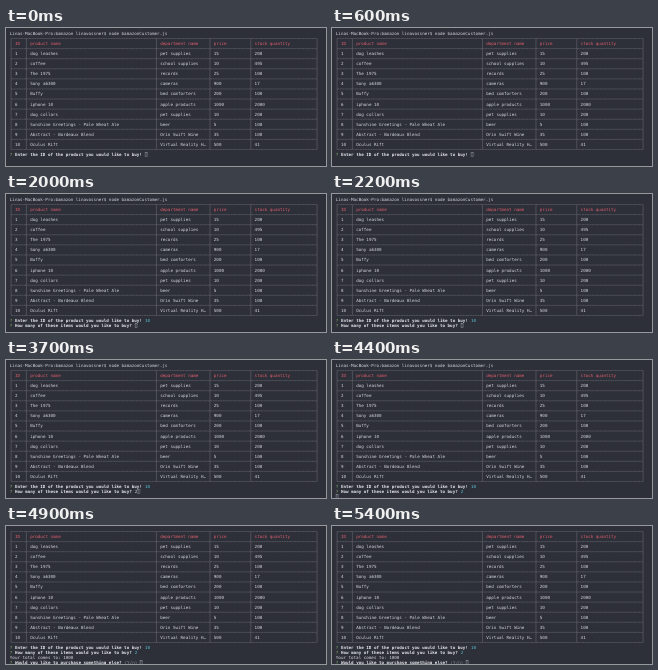
Recreate the animation shown at these times as an HTML page. Size 320 by 138 pixels, loop 7.5 s.

```html
<!DOCTYPE html>
<html lang="en">
<head>
<meta charset="utf-8">
<title>Store terminal</title>
<style>
  html, body { margin: 0; width: 100%; height: 100%; overflow: hidden; background: #2d2f39; }
  svg { display: block; width: 100vw; height: 100vh; --w: 2.55px; --h: 5.04px; }
  text {
    font: 4.2355px "DejaVu Sans Mono", "Liberation Mono", monospace;
    text-rendering: geometricPrecision;
    white-space: pre;
    fill: #d8dae0;
  }
  .head { fill: #e0606c; }
  .ask { font-weight: bold; fill: #e6e8ec; }
  .mark { fill: #8fc46c; }
  .dim { fill: #8b8f98; }
  .grid { fill: none; stroke: #747279; stroke-width: .5; }
  .dash { stroke-dasharray: 2.2 .35; }
  #cursor { fill: none; stroke: #a6a8af; stroke-width: .5; }

  #screen, #cursor, .timed { animation: 7.5s step-end infinite; }
  #screen { animation-name: scroll; }
  #cursor { animation-name: cursor; }
  #prompt { animation-name: leave; }
  #digit1 { animation-name: digit1; }
  #digit0 { animation-name: digit0; }
  #amount { animation-name: amount; }
  #second { animation-name: second; }
  #result { animation-name: result; }

  @keyframes scroll {
    0% { transform: none; }
    60%, 100% { transform: translateY(calc(-1 * var(--h))); }
  }
  @keyframes cursor {
    0%      { transform: translate(calc(53 * var(--w)), calc(24 * var(--h))); }
    10.66%  { transform: translate(calc(54 * var(--w)), calc(24 * var(--h))); }
    14.66%  { transform: translate(calc(55 * var(--w)), calc(24 * var(--h))); }
    26.66%  { transform: translate(calc(49 * var(--w)), calc(25 * var(--h))); }
    49.33%  { transform: translate(calc(50 * var(--w)), calc(25 * var(--h))); }
    58.66%  { transform: translate(0, calc(26 * var(--h))); }
    60%, 100% { transform: translate(calc(51 * var(--w)), calc(27 * var(--h))); }
  }
  @keyframes leave { 0% { opacity: 1; } 60%, 100% { opacity: 0; } }
  @keyframes digit1 {
    0% { opacity: 0; fill: #d8dae0; }
    10.66% { opacity: 1; fill: #d8dae0; }
    26.66%, 100% { opacity: 1; fill: #5ac6d4; }
  }
  @keyframes digit0 {
    0% { opacity: 0; fill: #d8dae0; }
    14.66% { opacity: 1; fill: #d8dae0; }
    26.66%, 100% { opacity: 1; fill: #5ac6d4; }
  }
  @keyframes amount {
    0% { opacity: 0; fill: #d8dae0; }
    49.33% { opacity: 1; fill: #d8dae0; }
    58.66%, 100% { opacity: 1; fill: #5ac6d4; }
  }
  @keyframes second { 0% { opacity: 0; } 26.66%, 100% { opacity: 1; } }
  @keyframes result { 0% { opacity: 0; } 60%, 100% { opacity: 1; } }
</style>
</head>
<body>
<svg viewBox="0 0 320 138"><g id="screen"></g></svg>
<script>
  const LEFT = 3.8, TOP = 3, CELL_W = 2.55, CELL_H = 5.04, BASELINE = 3.95;
  const borders = [0, 6, 57, 78, 94, 120];
  const header = ['ID', 'product name', 'department name', 'price', 'stock quantity'];
  const rows = [
    ['dog leashes', 'pet supplies', 15, 200],
    ['coffee', 'school supplies', 10, 495],
    ['The 1975', 'records', 25, 100],
    ['Sony a6300', 'cameras', 900, 17],
    ['Buffy', 'bed comforters', 200, 100],
    ['iphone 10', 'apple products', 1000, 2000],
    ['dog collars', 'pet supplies', 10, 200],
    ['Sunshine Greetings - Pale Wheat Ale', 'beer', 5, 100],
    ['Abstract - Bordeaux Blend', 'Orin Swift Wine', 35, 100],
    ['Oculus Rift', 'Virtual Reality H…', 500, 41]
  ];

  const colX = col => LEFT + col * CELL_W;
  const lineY = line => TOP + line * CELL_H;
  const put = (col, line, str, attrs = '') =>
    `<text x="${colX(col)}" y="${lineY(line) + BASELINE}" ${attrs}>${str}</text>`;
  const ask = (line, str) =>
    put(0, line, '?', 'class="mark"') + put(2, line, str, 'class="ask"');
  const tableRow = (cells, line, attrs) =>
    cells.map((cell, i) => put(borders[i] + 2, line, cell, attrs)).join('');

  function grid() {
    const mid = i => colX(i + 0.5), level = line => lineY(line + 0.5);
    const across = Array.from({ length: 12 }, (_, i) =>
      `M${mid(0)} ${level(1 + 2 * i)}H${mid(120)}`).join('');
    const down = borders.map(b => `M${mid(b)} ${level(1)}V${level(23)}`).join('');
    return `<path class="grid dash" d="${across}"/><path class="grid" d="${down}"/>`;
  }

  document.getElementById('screen').innerHTML =
    put(0, 0, 'Linas-MacBook-Pro:bamazon linavossner$ node bamazonCustomer.js',
      'id="prompt" class="timed"') +
    grid() +
    tableRow(header, 2, 'class="head"') +
    rows.map((row, i) => tableRow([i + 1, ...row], 4 + 2 * i)).join('') +
    ask(24, 'Enter the ID of the product you would like to buy!') +
    put(53, 24, '1', 'id="digit1" class="timed"') +
    put(54, 24, '0', 'id="digit0" class="timed"') +
    `<g id="second" class="timed">${ask(25, 'How many of these items would you like to buy?')}</g>` +
    put(49, 25, '2', 'id="amount" class="timed"') +
    `<g id="result" class="timed">
      ${put(0, 26, 'Your total comes to: 1000')}
      ${ask(27, 'Would you like to purchase something else?')}
      ${put(45, 27, '(Y/n)', 'class="dim"')}
    </g>
    <rect id="cursor" x="${LEFT + 0.3}" y="${TOP + 0.3}" width="${CELL_W - 0.6}" height="${CELL_H - 0.6}"/>`;
</script>
</body>
</html>
```
